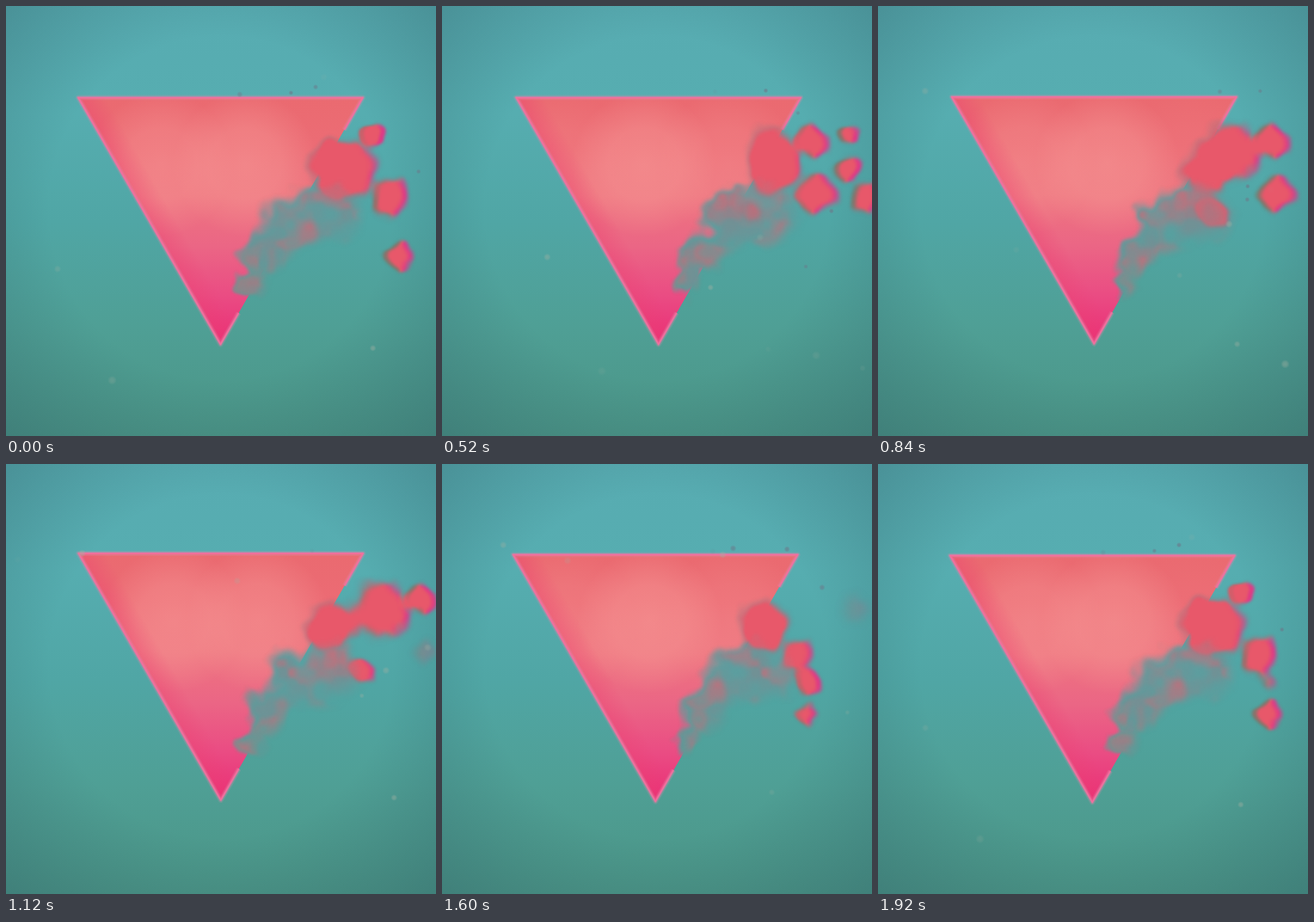
An HTML page with a canvas for the animation above (1.96 s loop, 500 px wide and 500 px high).

```html
<!DOCTYPE html>
<html lang="en">
<head>
<meta charset="utf-8">
<title>Dissolving triangle</title>
<style>
  html, body { margin: 0; width: 100%; height: 100%; overflow: hidden; background: #4fa3a1; }
  canvas { display: block; width: 500px; height: 500px; }
</style>
</head>
<body>
<canvas id="stage" width="500" height="500"></canvas>
<script>
const LOOP = 1960, STEP = 40, SIZE = 500;
const DRIFT = 176 / LOOP;          // px per ms, one whole noise period per loop
const TAU = Math.PI * 2;

const LEFT = [83.5, 106.5], RIGHT = [414.5, 106.5], TIP = [249, 393.5];

// Torn-off lumps: time of full size, x and y at that time, radius, half of the life span.
const LUMPS = [
  { t: 0, x: 398, y: 188, r: 30, life: 400 },
  { t: 80, x: 454, y: 223, r: 22, life: 640 },
  { t: 0, x: 457, y: 290, r: 14, life: 480 },
  { t: 160, x: 438, y: 149, r: 13, life: 480 },
  { t: 400, x: 460, y: 187, r: 17, life: 400 },
  { t: 560, x: 437, y: 218, r: 22, life: 640 },
  { t: 700, x: 446, y: 157, r: 20, life: 640 },
  { t: 980, x: 422, y: 169, r: 33, life: 700 },
  { t: 840, x: 388, y: 238, r: 18, life: 400 },
  { t: 1600, x: 424, y: 256, r: 15, life: 380 }
];
const SHOULDER = { x: 378, y: 188, r: 27 };
const MIST = [
  { x: 377, y: 240, r: 34 }, { x: 334, y: 250, r: 32 },
  { x: 302, y: 286, r: 24 }, { x: 285, y: 322, r: 15 }
];

const ctx = document.getElementById('stage').getContext('2d');
const makeLayer = (w, h) => {
  const c = document.createElement('canvas');
  c.width = w; c.height = h;
  return c.getContext('2d');
};
const clamp = (v, a = 0, b = 1) => Math.min(b, Math.max(a, v));
const mix = (a, b, p) => a + (b - a) * p;
const mixRgb = (a, b, p) => [mix(a[0], b[0], p), mix(a[1], b[1], p), mix(a[2], b[2], p)];
const smooth = (a, b, v) => { const p = clamp((v - a) / (b - a)); return p * p * (3 - 2 * p); };
const wrap = (v, n) => ((v % n) + n) % n;

function seeded(seed) {
  return () => (seed = (seed * 16807) % 2147483647) / 2147483647;
}

// Value noise from -1 to 1, periodic along x.
function hash(x, y, seed) {
  let h = Math.imul(x + 31 * seed, 374761393) ^ Math.imul(y + 7, 668265263);
  h = Math.imul(h ^ (h >>> 13), 1274126177);
  return ((h ^ (h >>> 16)) >>> 0) / 4294967296;
}
function noise(x, y, period, seed) {
  const ix = Math.floor(x), iy = Math.floor(y);
  const u = smooth(0, 1, x - ix), v = smooth(0, 1, y - iy);
  const a = wrap(ix, period), b = (a + 1) % period;
  return mix(mix(hash(a, iy, seed), hash(b, iy, seed), u),
             mix(hash(a, iy + 1, seed), hash(b, iy + 1, seed), u), v) * 2 - 1;
}
const cloud = (x, y, seed) =>
  noise(x / 22, y / 22, 8, seed) + 0.5 * noise(x / 11, y / 11, 16, seed + 1);

function density(blobs, x, y) {
  let sum = 0;
  for (const b of blobs) {
    const r = b.r * 1.5;
    const q = 1 - ((x - b.x) ** 2 + (y - b.y) ** 2) / (r * r);
    if (q > 0) sum += (b.w ?? 1) * q * q;
  }
  return sum;
}

function liveLumps(t) {
  const out = [{ ...SHOULDER, x: SHOULDER.x + 5 * Math.sin(TAU * t / LOOP) }];
  for (const { t: peak, x, y, r, life } of LUMPS) {
    const age = wrap(t - peak + LOOP / 2, LOOP) - LOOP / 2;
    const rest = 1 - Math.abs(age) / life;
    if (rest > 0) {
      out.push({ x: x + age * DRIFT, y, r: r * mix(0.75, 1, rest), w: smooth(0, 0.4, rest) });
    }
  }
  return out;
}

function addStops(gradient, colours) {
  colours.forEach((c, i) => gradient.addColorStop(i / (colours.length - 1), c));
  return gradient;
}
function softDot(c, x, y, r, rgb, alpha) {
  c.fillStyle = addStops(c.createRadialGradient(x, y, 0, x, y, r),
    [1, 0.75, 0].map(k => `rgba(${rgb},${alpha * k})`));
  c.fillRect(x - r, y - r, 2 * r, 2 * r);
}

const backdrop = makeLayer(SIZE, SIZE);
(function paintBackdrop(c) {
  c.fillStyle = addStops(c.createLinearGradient(0, 0, 0, SIZE),
    ['#58acb2', '#56adb0', '#50a6a5', '#4f9f95', '#4b9586']);
  c.fillRect(0, 0, SIZE, SIZE);
  c.fillStyle = addStops(c.createRadialGradient(250, 235, 200, 250, 235, 360),
    ['rgba(48,98,104,0)', 'rgba(48,98,104,.4)']);
  c.fillRect(0, 0, SIZE, SIZE);
})(backdrop);

const body = makeLayer(SIZE, SIZE);
const ramp = addStops(body.createLinearGradient(0, 105, 0, 395),
  ['#ea6a70', '#ec6b74', '#ee747f', '#eb6685', '#ea4c83', '#ea2c76']);
const sideTint = addStops(body.createLinearGradient(165, 250, 190, 235.6),
  ['rgba(236,62,112,.4)', 'rgba(236,62,112,0)']);

function trace(c, points) {
  c.beginPath();
  points.forEach(p => c.lineTo(...p));
}

// Bright patches pass behind the face, two of them per loop.
function paintGlow(c, t) {
  const gap = 98;
  for (let k = 0; k < 3; k++) {
    const x = 110 + wrap(70 + t * 2 * gap / LOOP, gap) + k * gap;
    const light = Math.cos(clamp((x - 240) / 140, -1, 1) * Math.PI / 2);
    softDot(c, x, 184, 84, '246,152,150', 0.62 * light);
  }
}

function paintBody(t) {
  const c = body;
  const dx = 1 + 1.8 * Math.sin(TAU * (t - 100) / LOOP);
  const dy = -3 * Math.exp(-(((t - 1250) / 350) ** 2));
  c.clearRect(0, 0, SIZE, SIZE);
  c.save();
  c.translate(dx, dy);
  c.save();
  trace(c, [LEFT, RIGHT, TIP]);
  c.clip();
  c.fillStyle = ramp;
  c.fillRect(0, 0, SIZE, SIZE);
  paintGlow(c, t);
  c.fillStyle = sideTint;
  c.fillRect(0, 0, SIZE, SIZE);
  c.restore();
  trace(c, [[270, 357], TIP, LEFT, RIGHT, [393, 144]]);
  c.lineJoin = 'round';
  for (const [width, colour] of [[6, 'rgba(214,140,170,.22)'], [3.4, 'rgba(240,120,165,.4)'], [1.6, '#f0709f']]) {
    c.lineWidth = width;
    c.strokeStyle = colour;
    c.stroke();
  }
  c.restore();
}

const BOX = { x: 250, y: 110, w: 130, h: 125, scale: 2 };
const smoke = makeLayer(BOX.w, BOX.h), holes = makeLayer(BOX.w, BOX.h);
const smokeData = smoke.createImageData(BOX.w, BOX.h);
const holeData = holes.createImageData(BOX.w, BOX.h);
const lumpMap = new Float32Array(BOX.w * BOX.h);
const placeBox = (c, layer) =>
  c.drawImage(layer.canvas, BOX.x, BOX.y, BOX.w * BOX.scale, BOX.h * BOX.scale);

const RED = [232, 88, 106], MAGENTA = [222, 56, 136], DARK = [92, 128, 108];
const DUSK = [134, 124, 134], GREY = [116, 143, 148], ROSE = [208, 104, 118];

function eachCell(fn) {
  for (let j = 0, i = 0; j < BOX.h; j++) {
    for (let k = 0; k < BOX.w; k++, i++) fn(i, BOX.x + k * BOX.scale, BOX.y + j * BOX.scale);
  }
}

function paintSmoke(t) {
  const lumps = liveLumps(t), out = smokeData.data, hole = holeData.data;
  const warp = (x, y) => [cloud(x - t * DRIFT, y, 1), cloud(x - t * DRIFT, y, 5)];

  eachCell((i, x, y) => {
    const [a, b] = warp(x, y);
    lumpMap[i] = smooth(0.03, 0.5, density(lumps, x + a * 5, y + b * 5));
  });
  eachCell((i, x, y) => {
    const [a, b] = warp(x, y);
    const haze = density(MIST, x + a * 8, y + b * 8) * (1 + 0.35 * a);
    const veil = smooth(0.02, 0.8, haze) * clamp(0.62 + 0.35 * b, 0.2, 0.9);
    const lump = lumpMap[i] * (1 - 0.45 * smooth(0.2, 0.9, haze));

    // Colour fringes: magenta on the right side of a lump, dark green on the left.
    const rim = (lumpMap[i - 3] - lumpMap[i + 3] || 0) * smooth(395, 440, x);
    let red = mixRgb(DUSK, RED, lumpMap[i]);
    red = mixRgb(red, MAGENTA, clamp(rim));
    red = mixRgb(red, DARK, clamp(-rim * 0.7));
    const grey = mixRgb(GREY, ROSE, smooth(-0.5, 0.8, a - 0.5 * b));

    const alpha = lump + veil * (1 - lump);
    const rgb = mixRgb(grey, red, alpha ? lump / alpha : 0);
    out.set([...rgb, alpha * 255], i * 4);
    hole[i * 4 + 3] = smooth(0.05, 0.6, haze) * 255;
  });
  smoke.putImageData(smokeData, 0, 0);
  holes.putImageData(holeData, 0, 0);
}

// Dust: pale slow motes everywhere, dark quick crumbs near the top and right edges.
const random = seeded(47);
const between = (a, b) => mix(a, b, random());
const motes = Array.from({ length: 12 }, () => ({
  x: between(10, 470), y: between(30, 480), r: between(3, 5.5),
  born: between(0, LOOP), life: between(700, 1500), vx: 0.12, vy: between(-0.07, 0.05),
  rgb: '160,176,162', alpha: 0.5
}));
const crumbs = Array.from({ length: 22 }, (_, i) => ({
  x: i % 2 ? between(240, 370) : between(390, 440), y: i % 2 ? between(93, 103) : between(120, 310),
  r: between(2.5, 4), born: between(0, LOOP), life: between(250, 450), vx: 0.25, vy: 0,
  rgb: '108,118,136', alpha: 0.7
}));

function paintDust(t) {
  for (const d of [...motes, ...crumbs]) {
    const age = wrap(t - d.born, LOOP);
    if (age >= d.life) continue;
    const fade = Math.sin(Math.PI * age / d.life);
    softDot(ctx, d.x + age * d.vx, d.y + age * d.vy, d.r, d.rgb, d.alpha * fade);
  }
}

function render(t) {
  paintBody(t);
  paintSmoke(t);
  body.globalCompositeOperation = 'destination-out';
  placeBox(body, holes);
  body.globalCompositeOperation = 'source-over';
  ctx.drawImage(backdrop.canvas, 0, 0);
  ctx.drawImage(body.canvas, 0, 0);
  placeBox(ctx, smoke);
  paintDust(t);
}

let shown = -1;
const start = performance.now();
function tick() {
  const t = Math.floor(((performance.now() - start) % LOOP) / STEP) * STEP;
  if (t !== shown) render(shown = t);
  requestAnimationFrame(tick);
}
tick();
</script>
</body>
</html>
```
